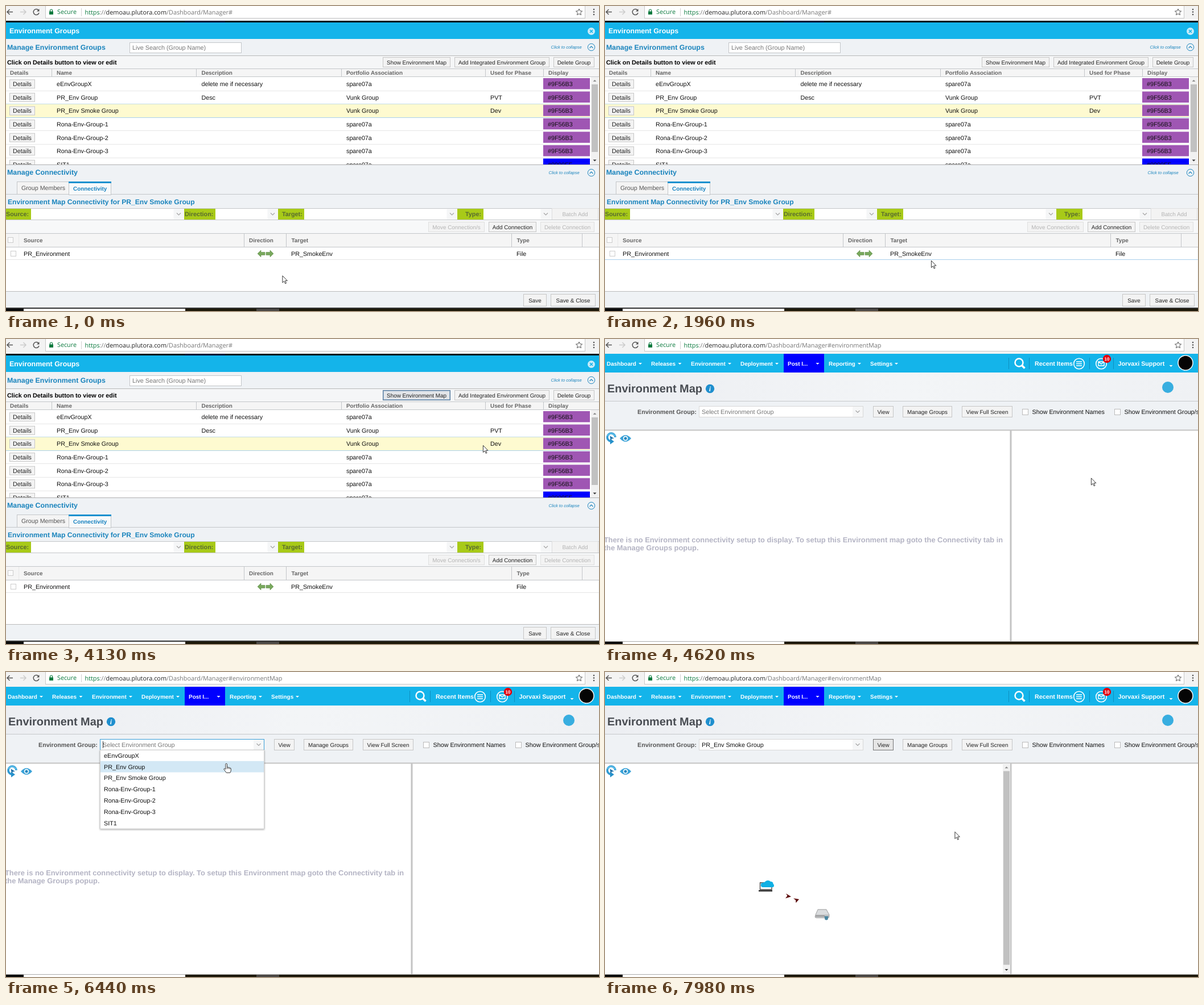
Animation, 1042 px wide and 537 px high, one loop 8000 ms. Source, as an HTML page:

```html
<!DOCTYPE html>
<html lang="en">
<head>
<meta charset="utf-8">
<title>Environment groups walkthrough</title>
<style>
html, body { margin: 0; height: 100%; overflow: hidden; background: #fff }
svg { display: block; width: 100%; height: 100%; font-family: "Liberation Sans", Arial, sans-serif; text-rendering: geometricPrecision }
text { white-space: pre }
.url { font-family: "Open Sans", sans-serif }
</style>
</head>
<body>
<svg id="stage" viewBox="0 0 1042 537"></svg>
<script>
const LOOP = 8000, STEP = 70;
const BLUE = '#14b4ea', LINK = '#1a84bd', PANEL = '#eff2f5', LINE = '#c3c6c9', FOCUS = '#3a9fd8', HOVER = '#a9cfec';
const groups = ['eEnvGroupX', 'PR_Env Group', 'PR_Env Smoke Group', 'Rona-Env-Group-1', 'Rona-Env-Group-2', 'Rona-Env-Group-3', 'SIT1'];

// Drawing helpers; text is placed by the middle of its capitals
const rect = (x, y, w, h, fill, extra = '') => `<rect x="${x}" y="${y}" width="${w}" height="${h}" fill="${fill}" ${extra}/>`;
const box = (x, y, w, h, fill = '#fff', stroke = LINE, extra = '') => rect(x + .5, y + .5, w - 1, h - 1, fill, `stroke="${stroke}" ${extra}`);
const path = (d, stroke, width = 1, fill = 'none', extra = '') => `<path d="${d}" stroke="${stroke}" stroke-width="${width}" fill="${fill}" ${extra}/>`;
const circle = (x, y, r, fill, stroke = 'none', width = 1) => `<circle cx="${x}" cy="${y}" r="${r}" fill="${fill}" stroke="${stroke}" stroke-width="${width}"/>`;
const text = (x, y, s, size = 10.75, fill = '#111', extra = '') =>
  `<text x="${x}" y="${(y + size * .355).toFixed(2)}" font-size="${size}" fill="${fill}" ${extra}>${s.replace(/&/g, '&amp;')}</text>`;
const bold = (x, y, s, size, fill, extra = '') => text(x, y, s, size, fill, 'font-weight="700" ' + extra);
const middle = 'text-anchor="middle"';
const hline = (y, x = 0, to = 1042, color = LINE) => rect(x, y, to - x, 1, color);
const vline = (x, y, to, color = LINE) => rect(x, y, 1, to - y, color);
const button = (x, y, w, h, label, o = {}) =>
  box(x, y, w, h, o.fill || '#f3f3f3', o.stroke || '#c6c6c6') + text(x + w / 2, y + h / 2, label, o.size || 9.9, o.color || '#222', middle);
const chevron = (x, y) => rect(x - 9, y - 9, 18, 18, '#f5f6f7') + path(`M${x - 3.5} ${y - 2}l3.5 3.5l3.5-3.5`, '#a5a5a5', 1.2);
const triangle = (x, y, r, fill, up) => path(`M${x - r} ${y}h${2 * r}l${-r} ${up ? -r : r}z`, 'none', 0, fill);
const group = (id, body) => `<g id="${id}">${body}</g>`;

function browser() {
  return rect(0, 0, 1042, 26, '#f3f3f3') + box(69, -3, 949, 25, '#fff', '#c8c8c8') +
    path('M12 10.500H2M6.500 6L2 10.500l4.500 4.500', '#555', 1.5) +
    path('M25 10.500h10M30.500 6l4.500 4.500l-4.500 4.500', '#ccc', 1.5) +
    path('M57.500 8A5 5 0 1 0 58 12', '#555', 1.5) + path('M58.500 5v4.500h-4.500z', 'none', 0, '#555') +
    rect(76, 9.5, 7, 5.5, '#0b7a3e') + path('M77.500 10V8a2 2 0 0 1 4 0v2', '#0b7a3e', 1.2) +
    text(90, 10.5, 'Secure', 10.8, '#0b7a3e', 'class="url"') + vline(132, 4, 18, '#d0d0d0') +
    path('M1007 5l1.600 3.700l4 .4l-3 2.700l.9 3.900l-3.500-2l-3.500 2l.9-3.900l-3-2.700l4-.4z', '#555') +
    [6, 10.5, 15].map(y => circle(1033, y, 1.3, '#555')).join('') +
    `<text class="url" x="138.500" y="14.600" font-size="10.87" fill="#777"><tspan fill="#0b7a3e">https</tspan>://<tspan fill="#222">demoau.plutora.com</tspan>/Dashboard/Manager#<tspan id="hash"></tspan></text>`;
}

function desktopEdge() {
  return rect(0, 533, 1042, 4, '#1d1808') + rect(0, 533, 31, 4, '#080808') + rect(31, 533, 284, 4, '#fff') + rect(440, 533, 40, 4, '#4a4744');
}

function groupRow(name, i) {
  const y = 125.5 + 23.6 * i, mid = y + 11.8, last = i === 6;
  const more = [['delete me if necessary', 'spare07a'], ['Desc', 'Vunk Group', 'PVT'], ['', 'Vunk Group', 'Dev']][i] || ['', 'spare07a'];
  return (i === 2 ? rect(0, y, 1026, 23.6, '#fefad0') : '') +
    hline(Math.round(y + 23), 0, 1026, i === 1 || i === 2 ? HOVER : '#e6e6e6') +
    button(6, mid - 8, 45, 16, 'Details', { size: 10.75 }) + text(89, mid, name) +
    text(343.5, mid, more[0]) + text(598, mid, more[1]) + text(851, mid, more[2] || '') +
    rect(944, y + 1.5, 82, 19.5, last ? '#0000ff' : '#9f56b3') + text(952, mid, last ? '#0000FF' : '#9F56B3');
}

function collapseLink(x, y) {
  return text(x, y, 'Click to collapse', 7.5, LINK, 'font-style="italic"') + circle(1028.5, y + .5, 6.2, 'none', LINK) +
    path(`M1025.500 ${y + 2}l3-3l3 3`, LINK, 1.1);
}

function managerScreen() {
  const fields = [['Source:', 0, 44, 313, 0], ['Direction:', 313, 368, 478, 314], ['Target:', 478, 524, 793, 485], ['Type:', 793, 839, 958, 807]];
  const off = { color: '#b4b4b4', stroke: '#e0e0e0' };
  const columns = [['Details', 7, 80], ['Name', 89, 334], ['Description', 343.5, 589], ['Portfolio Association', 598, 842], ['Used for Phase', 851, 944], ['Display', 953]];
  const lower = [['Source', 31, 418], ['Direction', 427, 492], ['Target', 501.5, 888], ['Type', 897.5, 1012]];
  const headers = (list, y, top, end) => list.map(([s, x, edge]) => bold(x, y, s, 9.9, '#666') + (edge ? vline(edge, top, end) : '')).join('');
  return rect(0, 26, 1042, 507, PANEL) + rect(0, 26, 1042, 3, '#05121a') + rect(314, 26, 71, 3, '#000033') +
    rect(0, 29, 1042, 29, BLUE) + bold(6, 44, 'Environment Groups', 12.4, '#fff') +
    circle(1028.5, 44.5, 6.5, '#c9ecf9') + path('M1026 42l5 5m0-5l-5 5', BLUE, 1.7) +
    bold(2, 73, 'Manage Environment Groups', 12.4, LINK) + box(217, 64, 197, 19) + text(222, 73, 'Live Search (Group Name)', 10.8, '#777') +
    collapseLink(957.5, 72) + hline(87, 0, 1042, '#b8b8b8') + rect(0, 88, 1042, 22, '#f5f6f7') +
    bold(2, 99, 'Click on Details button to view or edit', 10.8, '#000') +
    button(662, 90, 119, 18, 'Show Environment Map') + button(788, 90, 167, 18, 'Add Integrated Environment Group') + button(962, 90, 72, 18, 'Delete Group') +
    group('mapPressed', button(662, 90, 119, 18, 'Show Environment Map', { fill: '#e2e5e9', stroke: '#54779a' }) + box(663, 91, 117, 16, 'none', '#9db6ce')) +
    hline(110) + rect(0, 111, 1042, 14, '#f5f5f5') + headers(columns, 117.5, 111, 125) + hline(124) +
    `<svg y="125" width="1042" height="154" viewBox="0 125 1042 154">${rect(0, 125, 1042, 154, '#fff')}${groups.map(groupRow).join('')}</svg>` +
    rect(1028, 125, 13, 154, '#f1f1f1') + triangle(1034.5, 133, 3, '#888', true) + rect(1029, 138, 11, 119, '#c1c1c1') + triangle(1034.5, 270.5, 3, '#333') +
    hline(279, 0, 1042, '#b0b0b0') + bold(2, 293, 'Manage Connectivity', 12.4, LINK) + collapseLink(953.5, 293) +
    hline(331) + box(19, 309, 92, 23, '#f4f4f4') + text(27, 320.5, 'Group Members', 10.7, '#555') +
    box(110, 309, 75, 24, '#f7f9fa') + rect(110, 309, 75, 3, '#1590ce') + bold(118, 321.5, 'Connectivity', 9.9, '#1682c0') +
    bold(3, 344.5, 'Environment Map Connectivity for PR_Env Smoke Group', 12.1, LINK) + hline(356) +
    fields.map(([s, x, edge, end, tx]) => rect(x, 357, edge - x, 19, '#a8ca18') + rect(edge, 357, end - edge, 19, '#fff') +
      bold(tx, 366.5, s, 10.8, '#586a30') + chevron(end - 9.5, 366.5)).join('') +
    button(959, 356, 82, 21, 'Batch Add', off) + hline(376) + rect(0, 377, 1042, 23, '#f7f8f9') +
    button(742, 380, 99, 18, 'Move Connection/s', off) + button(848, 380, 84, 18, 'Add Connection') + button(939, 380, 95, 18, 'Delete Connection', off) +
    hline(400) + rect(0, 401, 1042, 24, '#f5f5f5') + vline(22, 401, 424, '#e8e8e8') + headers(lower, 412.5, 401, 424) + hline(424) +
    box(3, 407, 10, 10, '#fafafa', '#ccc') + rect(0, 425, 1041, 77, '#fff') + hline(446, 0, 1042, '#e4e4e4') + box(8, 431, 10, 10, '#fff', '#ccc') +
    text(31, 436.5, 'PR_Environment') + text(501, 436.5, 'PR_SmokeEnv') + text(897, 436.5, 'File') +
    path('M442 436l6-6v3.500h7v5h-7v3.500zM470 436l-6-6v3.500h-7v5h7v3.500z', '#5f8a4a', .6, '#78a85c') +
    hline(502, 0, 1042, '#bbb') + button(909, 507, 41, 22, 'Save') + button(957, 507, 79, 22, 'Save & Close') + rect(0, 531, 1042, 2, '#333') +
    `<rect id="hover" height="1" fill="${HOVER}"/>`;
}

function mapScreen() {
  const menu = [['Dashboard', 3, 62], ['Releases', 81, 131.5], ['Environment', 151, 219], ['Deployment', 238, 302], ['Post I...', 321, 373.5], ['Reporting', 393, 447], ['Settings', 466, 512]];
  const check = (x, s) => box(x, 123, 11, 11, '#fff', '#bbb') + text(x + 17.5, 128.5, s);
  const nav = rect(0, 26, 1042, 33, BLUE) + rect(314, 26, 71, 33, '#0000ff') +
    menu.map(([s, x, arrow]) => bold(x, 43.5, s, 9.95, '#fff') + triangle(arrow, 42, 3, '#fff')).join('') +
    [709, 745, 851, 893].map(x => vline(x, 33, 53, '#0d8fc0')).join('') +
    circle(727.5, 41.5, 7, 'none', '#fff', 2.5) + path('M732.500 46.500l5 5', '#fff', 3.5) +
    bold(755, 43.5, 'Recent Items', 10.75, '#fff') + circle(833, 43.5, 9.3, 'none', '#fff', 1.6) + path('M828 40h10m-10 3.500h10m-10 3.500h10', '#fff', 1.6) +
    circle(872, 43.5, 9.3, 'none', '#fff', 1.6) + path('M867 40h10v7h-10zl5 4l5-4', '#fff', 1.4) +
    circle(882, 35, 7.2, '#e3000f') + bold(882, 35, '10', 8, '#fff', middle) +
    bold(901.5, 43.5, 'Jorvaxi Support', 10.75, '#fff') + triangle(994.5, 46, 3, '#fff') + circle(1020, 42, 13, '#050505', '#f2f2f2', 1.6);
  const toolbar = hline(109, 0, 1042, '#c6c8ca') + bold(57, 128.5, 'Environment Group:', 10.7, '#555') + box(165, 118, 289, 20, '#fff', '#d8d8d8') + chevron(444, 128) +
    group('comboFocus', box(165, 118, 289, 20, 'none', FOCUS)) + group('placeholder', text(170, 128, 'Select Environment Group', 10.8, '#777')) +
    group('chosen', text(170, 128, groups[2])) + `<rect id="caret" y="122" width="1" height="12" fill="#333"/>` +
    button(471, 118, 36, 20, 'View') + group('viewFocus', button(471, 118, 36, 20, 'View', { fill: '#e6e6e6', stroke: '#777' })) +
    button(523, 118, 87, 20, 'Manage Groups') + button(627, 118, 89, 20, 'View Full Screen') +
    check(733, 'Show Environment Names') + check(895, 'Show Environment Group/s');
  const icons = path('M18 173a7 7 0 1 0-8 7', '#2f9ad2', 3.6) + path('M18 172a7.500 7.500 0 0 0-14-1', '#63c3ee', 1.6) +
    path('M9 175.500v10l7-5z', 'none', 0, '#2590ca') + path('M8.500 170.500l7.500 4.500l-4 .5l-2 3z', 'none', 0, '#1d6fa8') +
    path('M26 175q10-11.500 20 0q-10 11.500-20 0z', 'none', 0, '#3aa2d8') + circle(36, 175, 4.2, '#fff') + circle(36, 175, 2.6, '#2688c0');
  const server = path('M370 427l4-9h15l5 9v4q0 2-2 2h-20q-3 0-3-2z', '#9a9a9a', .7, '#bfc1c3') + path('M371 427l3.500-8h14l4.500 8z', 'none', 0, '#dadcde') +
    path('M370 429.500h16', '#888', 1.3) + path('M385.500 430h7l-1 6q-2.500 1.500-5 0z', 'none', 0, '#4a86a0');
  const laptop = path('M272.500 383v-12h20.500v12z', '#444', 1.3, '#fff') + path('M270 384h24v2.500h-24z', 'none', 0, '#333') +
    path('M278 379a4 4 0 0 1-.5-8q2.500-1 3.500-1.500a6 5 0 0 1 10-.5q4.500 0 4.500 4q1.500 1 1.500 3q0 3-3 3z', 'none', 0, '#10b0e4');
  const result = rect(699, 161, 13, 371, '#f1f1f1') + rect(700, 174.5, 11, 341, '#c1c1c1') + triangle(705.5, 169.5, 3, '#888', true) + triangle(705.5, 523, 3, '#333') +
    laptop + path('M318 390l9 5.500l-10 3l3.500-4.500zM341 400l-10-1.500l4 3l.5 5z', 'none', 0, '#5c0a0a') + server;
  return rect(0, 26, 1042, 507, PANEL) + rect(0, 59, 1042, 50, 'url(#shade)') + nav +
    bold(4, 87, 'Environment Map', 19.9, '#484c52') + circle(184.5, 87.5, 7.7, '#1f8fce') + text(184.5, 87.5, 'i', 12, '#fff', middle + ' font-weight="700" font-style="italic" font-family="Liberation Serif, serif"') +
    circle(989, 85, 10, '#38aee0') +
    group('mapBody', toolbar + rect(0, 160, 1042, 373, '#fff') + rect(0, 159.5, 1042, 2, '#c4c4c4') + rect(711.5, 161, 3, 372, '#c4c4c4') + icons +
      group('message', bold(-2, 353.5, 'There is no Environment connectivity setup to display. To setup this Environment map goto the Connectivity tab in', 12.86, '#b4b4c4') +
        bold(-2, 367.5, 'the Manage Groups popup.', 12.86, '#b4b4c4')) + group('result', result)) +
    group('dropdown', box(165, 137, 289, 139.5, '#fff', '#d0d0d0', 'filter="url(#drop)"') +
      `<rect id="option" x="166" width="287" height="19.8" fill="#d3e8f5"/>` + groups.map((s, i) => text(172, 147 + 19.8 * i, s)).join('')) +
    rect(0, 532, 1042, 1.5, '#aaa');
}

const stage = document.getElementById('stage');
stage.innerHTML =
  `<defs><linearGradient id="shade"><stop stop-color="#eceef2"/><stop offset=".5" stop-color="#f3f5f7"/><stop offset="1" stop-color="#eff1f4"/></linearGradient>
  <filter id="drop"><feDropShadow dx="0" dy="1" stdDeviation="1.8" flood-opacity=".4"/></filter></defs>` +
  group('manager', managerScreen()) + group('map', mapScreen()) + browser() + desktopEdge() +
  group('arrow', path('M.4.400V12.600L3.200 9.900L5.200 14.300L7 13.500L5.100 9.200H8.900Z', '#222', .9, '#fff')) +
  group('hand', path('M-1.500 1.500Q-1.500.300-.2.300T1.200 1.500V7Q3 6.200 3.700 7.300Q5.500 6.700 6 8.100Q8 7.700 8 9.500V12Q8 14 6.500 16.500H0Q-2 13.500-4.400 10.500Q-4.500 8.700-2.800 9.200L-1.500 10.500Z', '#222', .9, '#fff') +
    path('M1.200 7v3M3.700 7.500v2.500M6 8.300v2', '#222', .8));

// Pointer route: time, x, y
const route = [
  [0, 485.5, 474.5], [560, 300, 437], [840, 225, 446], [1400, 559, 454], [1680, 393, 448], [1820, 605, 448], [1890, 605, 448],
  [1960, 573, 448], [2240, 446, 440], [2520, 641, 426], [2730, 600, 433], [3570, 760, 111], [3640, 735, 101], [3780, 830, 111],
  [3920, 830, 111], [4130, 838, 187], [4270, 854, 244.5], [5320, 854, 244.5], [5390, 447, 127.5], [6090, 447, 127.5], [6650, 351.5, 181],
  [6930, 351.5, 181], [7420, 511, 126], [7560, 495, 128], [7700, 495, 128], [7980, 614.5, 281], [LOOP, 614.5, 281]];

function pointer(t) {
  const i = route.findIndex(key => key[0] > t);
  const [t0, x0, y0] = route[i - 1], [t1, x1, y1] = route[i];
  const p = (t - t0) / (t1 - t0);
  return [x0 + (x1 - x0) * p, y0 + (y1 - y0) * p];
}

const el = id => document.getElementById(id);
const show = (id, on) => el(id).setAttribute('display', on ? 'inline' : 'none');
const within = (t, from, to = LOOP) => t >= from && t < to;

function draw(t) {
  const [x, y] = pointer(t), onMap = t >= 4270, picked = t >= 6930;
  show('manager', !onMap);
  show('map', onMap);
  el('hash').textContent = onMap ? 'environmentMap' : '';
  show('mapPressed', t >= 3640);
  const inGroups = within(y, 125.5, 267), inLinks = within(y, 425, 449);
  show('hover', inGroups || inLinks);
  el('hover').setAttribute('y', inLinks ? 446 : Math.round(148.5 + 23.6 * Math.floor((y - 125.5) / 23.6)));
  el('hover').setAttribute('width', inLinks ? 1042 : 1026);

  show('mapBody', t >= 4480);
  show('message', within(t, 4620, 7840));
  show('result', t >= 7840);
  show('comboFocus', within(t, 5530, 7700));
  show('placeholder', !picked);
  show('chosen', picked);
  show('caret', within(t, 5600, 5950) || within(t, 6440, 7420));
  el('caret').setAttribute('x', picked ? 279 : 170);
  show('dropdown', within(t, 5740, 6930));
  el('option').setAttribute('y', 137 + 19.8 * Math.max(0, Math.floor((y - 137) / 19.8)));
  show('viewFocus', t >= 7700);

  const hand = within(t, 5390, 7000) || within(t, 7490, 7770);
  show('hand', hand);
  show('arrow', !hand);
  el(hand ? 'hand' : 'arrow').setAttribute('transform', `translate(${x} ${y})`);
}

const start = performance.now();
function tick() {
  const t = (performance.now() - start) % LOOP;
  draw(Math.floor(t / STEP) * STEP);
  requestAnimationFrame(tick);
}
tick();
</script>
</body>
</html>
```
